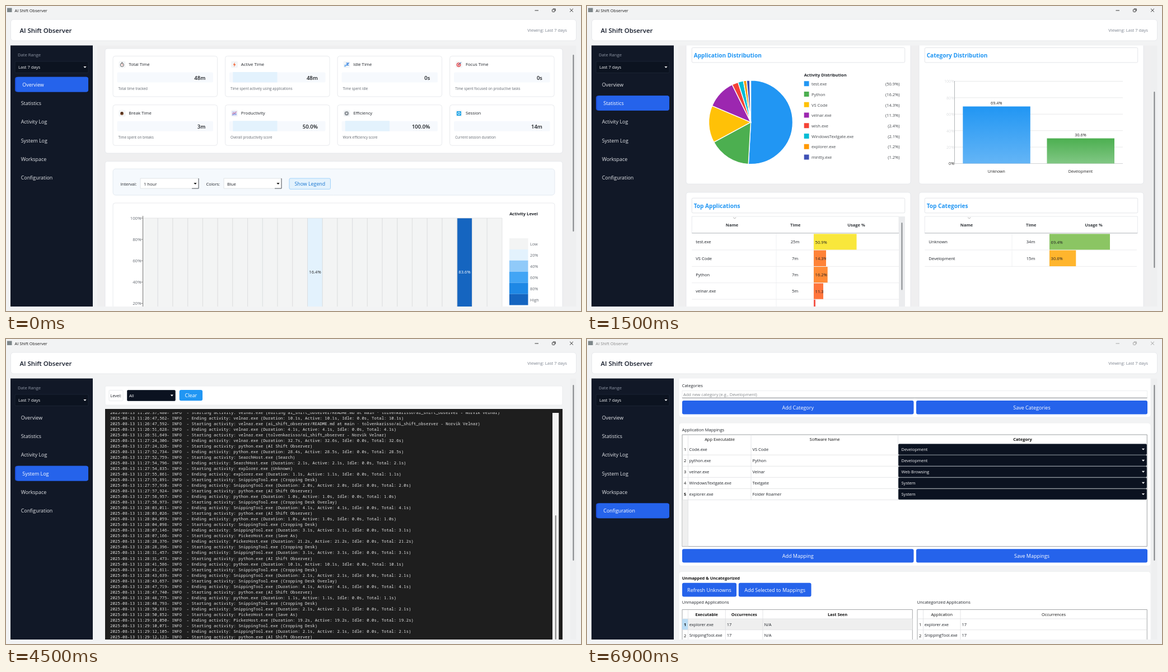
Write an HTML page with a canvas that moves like this. It is 1027x545 px and loops after 7500 ms.

```html
<!DOCTYPE html>
<html lang="en">
<head>
<meta charset="utf-8">
<title>AI Shift Observer</title>
<style>
  html, body { margin: 0; width: 100%; height: 100%; overflow: hidden; background: #f2f3f4; }
  canvas, #labels { position: absolute; left: 0; top: 0; width: 1027px; height: 545px; }
  text { white-space: pre; font-family: "Open Sans", "Noto Sans", sans-serif; }
  text.mono { font-family: "Noto Sans Mono", "DejaVu Sans Mono", monospace; }
</style>
</head>
<body>
<canvas id="shapes"></canvas>
<svg id="labels" viewBox="0 0 1027 545">
  <clipPath id="view"><rect x="160" y="70.5" width="867" height="466.5"/></clipPath>
  <clipPath id="logView"><rect x="177" y="131" width="798" height="406"/></clipPath>
</svg>
<script>
const W = 1027, H = 545, PAGE_MS = 1500;
const NS = 'http://www.w3.org/2000/svg';
const canvas = document.getElementById('shapes');
const labels = document.getElementById('labels');
const ctx = canvas.getContext('2d');
const dpr = window.devicePixelRatio || 1;
canvas.width = W * dpr;
canvas.height = H * dpr;

const BLUE = '#2563eb', SKY = '#2196f3', INK = '#1f2329', GREY = '#666b73';
const EDGE = '#e2e5e9', DARK = '#0b1220', LINE = '#dddfe1';
let layer;

// ---- helpers ----
function node(tag, attrs, parent) {
  const el = document.createElementNS(NS, tag);
  for (const key in attrs) el.setAttribute(key, attrs[key]);
  parent.append(el);
  return el;
}

function group(clip) {
  return node('g', { class: 'scene', ...(clip && { 'clip-path': `url(#${clip})` }) }, labels);
}

// y is the middle of the capital letters
function label(x, y, str, size = 7.6, fill = INK, opts = {}) {
  const el = node('text', {
    x, y: y + size * 0.357, fill, 'font-size': size,
    'font-weight': opts.weight || 400, 'text-anchor': opts.anchor || 'start',
    class: opts.cls || ''
  }, opts.parent || layer);
  el.textContent = str;
}
const MID = { anchor: 'middle' }, END = { anchor: 'end' };
const BOLD = { weight: 700 }, BOLD_MID = { weight: 700, anchor: 'middle' };

function box(x0, y0, x1, y1, fill, stroke, r = 0, lw = 0.8) {
  ctx.beginPath();
  ctx.roundRect(x0, y0, x1 - x0, y1 - y0, r);
  if (fill) { ctx.fillStyle = fill; ctx.fill(); }
  if (stroke) { ctx.strokeStyle = stroke; ctx.lineWidth = lw; ctx.stroke(); }
}

function path(points, stroke, lw = 0.8, fill) {
  ctx.beginPath();
  points.forEach(([x, y]) => ctx.lineTo(x, y));
  if (fill) { ctx.fillStyle = fill; ctx.fill(); }
  if (stroke) { ctx.strokeStyle = stroke; ctx.lineWidth = lw; ctx.stroke(); }
}
const hline = (x0, x1, y, color = LINE, lw = 0.8) => path([[x0, y], [x1, y]], color, lw);
const vline = (x, y0, y1, color = LINE, lw = 0.8) => path([[x, y0], [x, y1]], color, lw);

function disc(x, y, r, fill, stroke, lw = 1) {
  ctx.beginPath();
  ctx.arc(x, y, r, 0, 7);
  if (fill) { ctx.fillStyle = fill; ctx.fill(); }
  if (stroke) { ctx.strokeStyle = stroke; ctx.lineWidth = lw; ctx.stroke(); }
}

const arrow = (x, y, color) => path([[x - 2.6, y - 1.4], [x + 2.6, y - 1.4], [x, y + 1.5]], null, 0, color);
const chevron = (x, y) => path([[x - 2.5, y - 1], [x, y + 1], [x + 2.5, y - 1]], '#888', 0.7);

function darkCombo(x0, y0, x1, y1, str, textX) {
  box(x0, y0, x1, y1, DARK, '#1f2937', 1.5);
  label(textX, (y0 + y1) / 2 + 0.2, str, 7.5, '#f3f4f6');
  arrow(x1 - 6, (y0 + y1) / 2, '#fff');
}

function lightCombo(x0, x1, str) {
  box(x0, 308, x1, 326, '#fff', '#dadde0');
  path([[x1 - 12, 326], [x1, 326], [x1, 308]], '#55595e', 1);
  label(x0 + 6, 318, str);
  arrow(x1 - 6, 317.5, '#111');
}

function button(x0, y0, x1, y1, str, fill = BLUE) {
  box(x0, y0, x1, y1, fill, null, 3);
  label((x0 + x1) / 2, (y0 + y1) / 2 + 0.3, str, 9, '#fff', MID);
}

// ---- data ----
const REPO = 'ai_shift_observer', USER_REPO = 'tolvenkarisso/' + REPO;
const BROWSER = ' - Norvik Velnar', APP = 'AI Shift Observer', CROP = 'Cropping Desk';
const README = `${REPO}/README.md at main · ${USER_REPO}${BROWSER}`;
const KINDS = {
  e: ['velnar.exe', 'Editing ' + README],
  r: ['velnar.exe', README],
  v: ['velnar.exe', USER_REPO + BROWSER],
  p: ['python.exe', APP],
  h: ['SearchHost.exe', 'Search'],
  x: ['explorer.exe', 'Unknown'],
  s: ['SnippingTool.exe', CROP],
  o: ['SnippingTool.exe', CROP + ' Overlay'],
  k: ['PickerHost.exe', 'Save As']
};
// kind, start, end, duration, active time where it differs
const SESSIONS = `e 26:37,480 26:47,562 10.1
r 26:47,592 26:51,628 4.1
v 26:51,649 27:24,306 32.7 32.6
p 27:24,326 27:52,734 28.4 28.5
h 27:52,759 27:54,796 2.1
x 27:54,835 27:55,861 1.1
s 27:55,891 27:57,910 2.0
p 27:57,924 27:58,957 1.0
o 27:58,973 28:03,011 4.1
p 28:03,026 28:04,059 1.0
s 28:04,098 28:07,146 3.1
k 28:07,166 28:28,376 21.2
s 28:28,396 28:31,457 3.1
p 28:31,473 28:41,586 10.1
s 28:41,611 28:43,639 2.1
o 28:43,657 28:47,719 4.1
p 28:47,740 28:48,775 1.1
s 28:48,793 28:50,831 2.1
k 28:50,852 29:10,050 19.2
s 29:10,071 29:12,105 2.1
p 29:12,123`.split('\n').map(row => {
  const [kind, start, end, dur, active = dur] = row.split(' ');
  const [exe, title] = KINDS[kind];
  return { exe, title, start, end, dur, active };
});
const USAGE = [
  ['test.exe', '50.9', SKY], ['Python', '16.2', '#4caf50'], ['VS Code', '14.3', '#ffc107'],
  ['velnar.exe', '11.3', '#9c27b0'], ['wish.exe', '2.4', '#f44336'],
  ['WindowsTextgate.exe', '2.1', '#00bcd4'], ['explorer.exe', '1.2', '#ff9800'], ['mintty.exe', '1.2', '#3f51b5']
];
const NAV = ['Overview', 'Statistics', 'Activity Log', 'System Log', 'Workspace', 'Configuration'];

// ---- window frame ----
function drawFrame(active, inactive) {
  const pen = inactive ? '#9a9a9a' : '#222';
  box(2, 3.5, 10.5, 11, '#7d8689');
  label(15.5, 8, APP, 7.45, inactive ? '#888' : '#1b1b1b');
  hline(944.5, 951, 8, pen, 0.9);
  box(975.5, 6, 980, 10.5, null, pen, 1, 0.9);
  path([[977, 5], [981.3, 5], [981.3, 9]], pen, 0.9);
  path([[1007, 4.8], [1013, 10.6]], pen, 0.9);
  path([[1013, 4.8], [1007, 10.6]], pen, 0.9);

  box(8.5, 24, 1018.5, 62, '#fff', EDGE, 5);
  label(24.5, 44, APP, 11.4, '#111827', { weight: 600 });
  label(1002, 43.5, 'Viewing: Last 7 days', 7.65, '#7b828e', END);

  box(8, 70.5, 155, 537, '#111827');
  label(21, 87, 'Date Range', 7.65, '#8f97a5');
  box(16, 99, 147, 119.5, '#0c1320', '#1d2737', 2);
  label(22, 109.5, 'Last 7 days', 7.6, '#f3f4f6');
  arrow(141, 109.3, '#fff');
  NAV.forEach((name, i) => {
    const y = 140.5 + i * 33.34, on = i === active;
    if (on) {
      box(16, y - 13.7, 147, y + 13, '#1d4ed8', null, 4);
      box(18, y - 13.7, 147, y + 13, BLUE, null, 4);
    }
    label(on ? 29.3 : 26.7, y, name, 8.9, on ? '#fff' : '#e5e7eb');
  });
}

function pageScroll(y0, y1) {
  box(1008, 70.5, 1018.5, 537, '#eeeff0');
  box(1012.4, y0, 1014.4, y1, '#808386', null, 1);
}

// ---- overview ----
const ICONS = [
  (x, y) => { disc(x, y + 0.6, 3, '#fff', '#555', 1); hline(x - 1.2, x + 1.2, y - 3.7, '#555', 1.1); path([[x, y - 1], [x, y + 0.8], [x + 1.2, y + 0.8]], '#d9534f', 0.8); },
  (x, y) => path([[x + 1, y - 4.3], [x - 2.3, y + 0.8], [x, y + 0.6], [x - 0.8, y + 4.4], [x + 2.5, y - 0.8], [x + 0.3, y - 0.6]], null, 0, '#f4602f'),
  (x, y) => { path([[x - 1, y - 2.5], [x + 3.5, y - 2.5], [x - 0.5, y + 1], [x + 4, y + 1]], '#2f7fe0', 1.3); path([[x - 4, y + 1], [x - 1.5, y + 1], [x - 4, y + 3.2], [x - 1, y + 3.2]], '#57a5f0', 1); },
  (x, y) => { disc(x - 0.4, y + 0.4, 3.8, '#e0393e'); disc(x - 0.4, y + 0.4, 2.5, '#fff'); disc(x - 0.4, y + 0.4, 1.5, '#e0393e'); path([[x, y], [x + 3.8, y - 3.8]], '#3a6ea5', 1.1); },
  (x, y) => { disc(x - 0.3, y, 2.9, '#7a4a2d'); disc(x - 0.3, y - 0.8, 1.7, '#3d2113'); },
  (x, y) => { box(x - 4.2, y - 4, x + 4.2, y + 4, '#d3d6f2'); path([[x - 3.6, y + 1], [x - 1, y - 1], [x + 0.6, y], [x + 3.8, y - 3.3]], '#d6426b', 0.9); path([[x - 3.6, y + 3], [x, y + 1], [x + 3.8, y + 1.4]], '#4b6fd8', 0.9); },
  (x, y) => { ctx.setLineDash([1.3, 1.1]); disc(x, y, 3.5, null, '#7b8288', 1.4); ctx.setLineDash([]); disc(x, y, 2.2, null, '#7b8288', 1.5); },
  (x, y) => { box(x - 4, y - 4, x + 4, y + 4, '#19a2e6', null, 1); disc(x, y, 2.1, null, '#fff', 1); }
];
const CARDS = [
  ['Total Time', '48m', 'Total time tracked'],
  ['Active Time', '48m', 'Time spent actively using applications', 1],
  ['Idle Time', '0s', 'Time spent idle'],
  ['Focus Time', '0s', 'Time spent focused on productive tasks'],
  ['Break Time', '3m', 'Time spent on breaks'],
  ['Productivity', '50.0%', 'Overall productivity score', 1],
  ['Efficiency', '100.0%', 'Work efficiency score', 1],
  ['Session', '14m', 'Current session duration']
];

function overview() {
  box(163, 70.5, 1008, 537, '#efeff0');
  box(177, 76, 994, 263, '#fff', EDGE, 4);
  CARDS.forEach(([title, value, note, filled], i) => {
    const x = 191 + (i % 4) * 200.55, y = i < 4 ? 89.5 : 176.7;
    box(x, y, x + 186.5, y + 72.5, '#fff', EDGE, 4);
    box(x + 10.5, y + 9, x + 22.5, y + 21, '#f3f5f7', null, 2);
    ICONS[i](x + 16.3, y + 15.2);
    label(x + 28.3, y + 15, title, 7.75);
    box(x + 7.5, y + 29, x + 179, y + 47, '#f6f9fd', null, 2);
    if (filled) box(x + 13.7, y + 28.5, x + 93, y + 47, '#e3f2fd');
    label(x + 165.3, y + 38.8, value, 9.5, '#16191d', { weight: 600, anchor: 'end' });
    label(x + 9.5, y + 58.5, note, 6.3, '#626870');
  });

  box(177, 277.5, 994, 545, '#fff', EDGE, 4);
  box(191, 291, 980, 338, '#f5f9fd', '#dee5ec', 5);
  label(204.5, 318, 'Interval:');
  lightCombo(240, 344, '1 hour');
  label(357.5, 318, 'Colors:');
  lightCombo(389, 492, 'Blue');
  box(506, 308, 579.5, 327.3, '#e3f2fd', '#90caf9', 2);
  label(542.8, 318, 'Show Legend', 8.85, '#1976d2', MID);

  box(191, 352, 980, 550, '#fff', EDGE, 4);
  const x0 = 244.5, top = 379, step = 26.73;
  for (let i = 0; i < 24; i++) {
    const x = x0 + i * step;
    box(x, top, x + step, 540, i === 11 ? '#e3f2fd' : i === 21 ? '#1565c0' : '#f3f4f4', '#d8dadb', 0, 0.7);
  }
  vline(x0, 375, 540, '#777', 1);
  for (let i = 0; i < 5; i++) {
    const y = top + i * 38.1;
    hline(241, 245, y, '#777');
    label(241.5, y + 0.3, 100 - i * 20 + '%', 7.8, GREY, END);
  }
  label(552, 475, '16.4%', 7.6, '#222', MID);
  label(819, 475, '83.6%', 7.6, '#fff', MID);
  label(924.5, 371.5, 'Activity Level', 7.6, INK, BOLD_MID);
  const scale = ['#f3f4f4', '#e3f2fd', '#90caf9', '#42a5f5', '#1e88e5', '#1565c0'];
  ['Low', '20%', '40%', '60%', '80%', 'High'].forEach((name, i) => {
    const y = 415 + i * 19.93;
    box(899, y, 932.5, y + 19.95, scale[i]);
    label(936, y + 10.3, name, 7.3, GREY);
  });
  pageScroll(87, 403);
}

// ---- statistics ----
function usageTable(x0, x1, cols, rows, nameX, heads, endX) {
  box(x0, 376, x1, 405.5, '#fff', EDGE);
  hline(x0, x1, 405.7, '#c9cccf', 1.4);
  ['Name', 'Time', 'Usage %'].forEach((h, i) => label(heads[i], 391.8, h, 7.5, '#33373c', BOLD_MID));
  chevron(heads[0] + 4.7, 378.8);
  rows.forEach(([name, time, pct, color, width], i) => {
    const y = 421.5 + i * 29.4;
    cols.forEach(x => vline(x, y - 14.5, y + 14.3, '#eceef0'));
    hline(x0, endX, y + 14.4, '#e6e8ea');
    box(cols[1], y - 14.3, cols[1] + width, y + 14, color);
    label(nameX, y, name, 7.55);
    label(heads[1] - 0.7, y, time, 7.55, INK, MID);
    const x = cols[1], h = 28.3;
    const cell = node('svg', { x, y: y - 14.3, width, height: h, viewBox: `${x} ${y - 14.3} ${width} ${h}` }, layer);
    label(x + 2.6, y + 0.4, pct + '%', 7.55, '#222', { parent: cell });
  });
}

function statistics() {
  box(163, 70.5, 1008, 537, '#efeff0');
  [[177, 'Application Distribution', 'Top Applications'], [593, 'Category Distribution', 'Top Categories']].forEach(([x, a, b]) => {
    box(x, 60, x + 401, 318, '#fff', EDGE, 4);
    box(x, 333, x + 401, 545, '#fff', EDGE, 4);
    [[88, a], [356.8, b]].forEach(([y, title]) => {
      box(x + 10.3, y - 13.5, x + 390.7, y + 13, '#fff', '#dcdfe3', 2);
      label(x + 13.7, y + 0.2, title, 10.1, SKY, BOLD);
    });
  });

  let angle = -Math.PI / 2;
  label(387.7, 123.5, 'Activity Distribution', 7.5, INK, BOLD);
  USAGE.forEach(([name, pct, color], i) => {
    const next = angle + pct / 100 * Math.PI * 2, y = 139 + i * 18.73;
    ctx.beginPath();
    ctx.moveTo(292.5, 207.7);
    ctx.arc(292.5, 207.7, 75, angle, next);
    ctx.closePath();
    ctx.fillStyle = color;
    ctx.fill();
    ctx.strokeStyle = '#fff';
    ctx.lineWidth = 1.4;
    ctx.stroke();
    angle = next;
    box(387.7, y - 4.7, 396.5, y + 4.3, color);
    label(401, y + 0.4, name, 7.5, '#44484d');
    label(558.5, y + 0.4, `(${pct}%)`, 7.5, '#44484d', END);
  });

  for (let i = 0; i < 6; i++) {
    const y = 134.5 + i * 29.4;
    hline(656.5, 957, y, i < 5 ? '#e3e4e5' : '#c8cacc');
    label(656, y + 0.3, 100 - i * 20 + '%', 7.1, i < 5 ? '#dcdee0' : '#222', END);
  }
  vline(656.5, 134, 281.5, '#9fa2a5');
  [[671.3, 179.5, SKY, '#64b5f6', '69.4%', 'Unknown'], [821.5, 236.5, '#4caf50', '#81c784', '30.6%', 'Development']]
    .forEach(([x, y, from, to, pct, name]) => {
      const fill = ctx.createLinearGradient(0, y, 0, 281.5);
      fill.addColorStop(0, from);
      fill.addColorStop(1, to);
      box(x, y, x + 120.5, 281.5, fill);
      label(x + 60, y - 6.3, pct, 7.3, '#222', MID);
      label(x + 60, 295.5, name, 6.95, '#222', MID);
    });

  usageTable(187.3, 557, [338, 405], [
    ['test.exe', '25m', '50.9', '#f9e73c', 76.5], ['VS Code', '7m', '14.3', '#ff8338', 22],
    ['Python', '7m', '16.2', '#ff8b36', 24.7], ['velnar.exe', '5m', '11.3', '#ff753c', 17],
    ['WindowsTextgate.exe', '1m', '2.1', '#f4574a', 3]
  ], 194.3, [259, 372.3, 481], 557);
  box(557, 376, 568, 537, '#ebecee');
  box(561.5, 387, 563.4, 507.5, '#84878a', null, 1);
  usageTable(603.3, 983.3, [759, 826], [
    ['Unknown', '34m', '69.4', '#8bc563', 108], ['Development', '15m', '30.6', '#ffb52d', 47.3]
  ], 610.3, [678, 793.3, 905], 982);
  pageScroll(153, 468);
}

// ---- activity log ----
function activityLog() {
  box(177, 83.5, 994, 118.5, '#f3f4f5', '#e4e6e8', 2);
  box(184, 91.3, 495, 111, '#fff', '#d1d5db', 2);
  label(189, 101.5, 'Search activities...', 7.5, '#8a8d91');
  darkCombo(502.5, 91.3, 602, 110.8, 'All Apps', 506);
  darkCombo(609.5, 91.3, 676, 110.8, 'All Status', 613);

  box(177, 132, 994, 545, '#eff0f1', '#e0e2e4');
  box(177.5, 132.5, 186.5, 155.5, '#fff');
  const heads = { Time: 224, Application: 314.5, 'Window Title': 601.5, Duration: 867, 'Active Time': 918.3, Status: 964.3 };
  for (const h in heads) label(heads[h], 144.3, h, 7.6, '#5f646b', BOLD_MID);
  chevron(229, 134.3);
  hline(177, 982, 155.7, '#c9cccf', 1.3);
  SESSIONS.slice(0, 19).reverse().forEach((s, i) => {
    const y = 166 + i * 20.03, first = i === 0;
    const secs = first ? '0s' : Math.floor(s.dur) + 's';
    box(187, y - 10, 981.5, y + 10.03, i % 2 ? '#f4f4f4' : '#fff');
    hline(187, 981.5, y + 10, '#e3e5e6', 0.7);
    hline(177, 186.5, y + 10, '#c6c9cb');
    label(195, y + 0.3, '2025-08-13 11:' + s.start.slice(0, 5), 7.7);
    label(272.8, y + 0.3, s.exe === 'python.exe' ? 'Python' : s.exe, 7.5);
    label(360.3, y + 0.3, s.title, 7.5);
    label(887.3, y + 0.3, secs, 7.6, INK, END);
    label(944.2, y + 0.3, secs, 7.6, INK, END);
    label(948.7, y + 0.3, first ? 'Idle' : 'Active', 7.5);
  });
  [270.5, 358, 844.5, 890, 946.5].forEach(x => vline(x, 156, 537, '#e3e5e6', 0.7));
  vline(186.8, 156, 537, '#d3d5d7');
  box(987, 144, 989, 256.5, '#808386', null, 1);
  pageScroll(82, 396);
}

// ---- system log ----
function systemLog() {
  box(177, 84, 994, 118, '#fff', '#e8eaec', 2);
  box(184, 91.5, 209, 110.5, '#fff', EDGE, 1.5);
  label(186.3, 101.5, 'Level:', 7.5);
  darkCombo(216.5, 91.5, 302.3, 110.5, 'All', 220);
  button(309.7, 91, 351, 110.3, 'Clear', SKY);

  box(177, 125, 994, 537, '#1e1e1e');
  box(976, 132, 987.3, 537, '#f3f3f3');
  box(980.8, 315, 982.8, 537, '#858585', null, 1);
  layer = group('logView');
  const lines = SESSIONS.flatMap(({ exe, title, start, end, dur, active }) => [
    [start, `Starting activity: ${exe} (${title})`],
    [end, `Ending activity: ${exe} (Duration: ${dur}s, Active: ${active}s, Idle: 0.0s, Total: ${active}s)`]
  ]).filter(([time]) => time);
  lines.forEach(([time, msg], i) =>
    label(186, 131.5 + i * 10.015, `2025-08-13 11:${time}- INFO  - ${msg}`, 7.35, '#e4e4e4', { cls: 'mono' }));
  pageScroll(82, 396);
}

// ---- configuration ----
function unmappedTable(x0, x1, cols, heads, headStyle, selected) {
  box(x0, 483.5, x1, 550, '#fff', '#8d9093');
  heads.forEach(([x, h]) => label(x, 492.3, h, 7.4, '#111', headStyle));
  if (selected) {
    box(x0, 500, x1, 519.7, '#efefef');
    box(x0, 500, x0 + 10.5, 519.7, '#b9dcf5');
  }
  hline(x0, x1, 500, LINE);
  hline(x0, x1, 519.7, LINE);
  cols.forEach(x => vline(x, 484, 537, LINE));
  ['explorer.exe', 'SnippingTool.exe'].forEach((exe, i) => {
    const y = 510 + i * 19.8;
    label(x0 + 5.2, y + 0.3, i + 1, 7.4, '#111', selected && !i ? BOLD_MID : MID);
    label(cols[0] + 2.2, y, exe, 7.5);
    label(cols[1] + 2.4, y, '17', 7.5);
    if (cols[2]) label(cols[2] + 2.4, y, 'N/A', 7.5);
  });
}

function configuration() {
  [[60, 140], [150, 405.5], [415.5, 550]].forEach(([y0, y1]) => box(164, y0, 1007, y1, '#fff', '#eceeef', 5));
  label(169.7, 83, 'Categories', 7.5);
  box(170, 92.5, 1000.5, 105.3, '#fff', '#e9ebec');
  hline(170, 1000.5, 105.3, '#888b8e', 1);
  label(172, 99.3, 'Add new category (e.g., Development)', 7.5, '#85888c');
  [[110, 134.5, 'Add Category', 'Save Categories'], [375.3, 399.6, 'Add Mapping', 'Save Mappings']].forEach(([y0, y1, a, b]) => {
    button(170, y0, 583.5, y1, a);
    button(588, y0, 1001, y1, b);
  });

  label(169.7, 162, 'Application Mappings', 7.5);
  box(170, 171, 1000.3, 370.7, '#fff', '#85888b');
  box(170.4, 287.5, 180.5, 370.3, '#efefef');
  label(237, 179.8, 'App Executable', 7.5, '#111', MID);
  label(424.5, 179.8, 'Software Name', 7.5, '#111', MID);
  label(778, 179.8, 'Category', 7.5, '#111', BOLD_MID);
  [['Code.exe', 'VS Code', 'Development'], ['python.exe', 'Python', 'Development'], ['velnar.exe', 'Velnar', 'Web Browsing'],
    ['WindowsTextgate.exe', 'Textgate', 'System'], ['explorer.exe', 'Folder Roamer', 'System']].forEach(([exe, name, kind], i) => {
    const y = 197.2 + i * 20.05;
    hline(170, 1000, y + 10, LINE);
    label(175.2, y + 0.4, i + 1, 7.4, '#111', i === 4 ? BOLD_MID : MID);
    label(182.6, y, exe, 7.5);
    label(295.5, y, name, 7.5);
    darkCombo(556.3, y - 9.4, 999.5, y + 9.2, kind, 561.5);
  });
  vline(180.5, 171, 370.5, LINE);
  [293, 555.5].forEach(x => vline(x, 171, 287.5, LINE));

  label(169.7, 427, 'Unmapped & Uncategorized', 7.4, '#111', BOLD);
  button(170, 435.8, 267, 460.5, 'Refresh Unknowns');
  button(270.8, 435.8, 400.5, 460.5, 'Add Selected to Mappings');
  label(169.7, 470.3, 'Unmapped Applications', 7.5);
  label(589.5, 470.3, 'Uncategorized Applications', 7.5);
  unmappedTable(170, 581.3, [180.5, 247.3, 314], [[213.7, 'Executable'], [280.8, 'Occurrences'], [447.5, 'Last Seen']], BOLD_MID, true);
  unmappedTable(590, 1000.3, [600.5, 667], [[633.7, 'Application'], [833.5, 'Occurrences']], MID, false);
  pageScroll(82, 396);
}

// ---- playback ----
const PAGES = [
  { draw: overview, nav: 0 }, { draw: statistics, nav: 1 }, { draw: activityLog, nav: 2 },
  { draw: systemLog, nav: 3 }, { draw: configuration, nav: 5, inactive: true }
];
let shown = -1;

function show(index) {
  const page = PAGES[index];
  labels.querySelectorAll('.scene').forEach(el => el.remove());
  ctx.setTransform(dpr, 0, 0, dpr, 0, 0);
  box(0, 0, W, H, '#f2f3f4');
  layer = group();
  drawFrame(page.nav, page.inactive);
  layer = group('view');
  ctx.save();
  ctx.beginPath();
  ctx.rect(160, 70.5, 867, 466.5);
  ctx.clip();
  page.draw();
  ctx.restore();
}

function tick() {
  const index = Math.floor(performance.now() / PAGE_MS) % PAGES.length;
  if (index !== shown) show(shown = index);
  requestAnimationFrame(tick);
}
tick();
</script>
</body>
</html>
```
